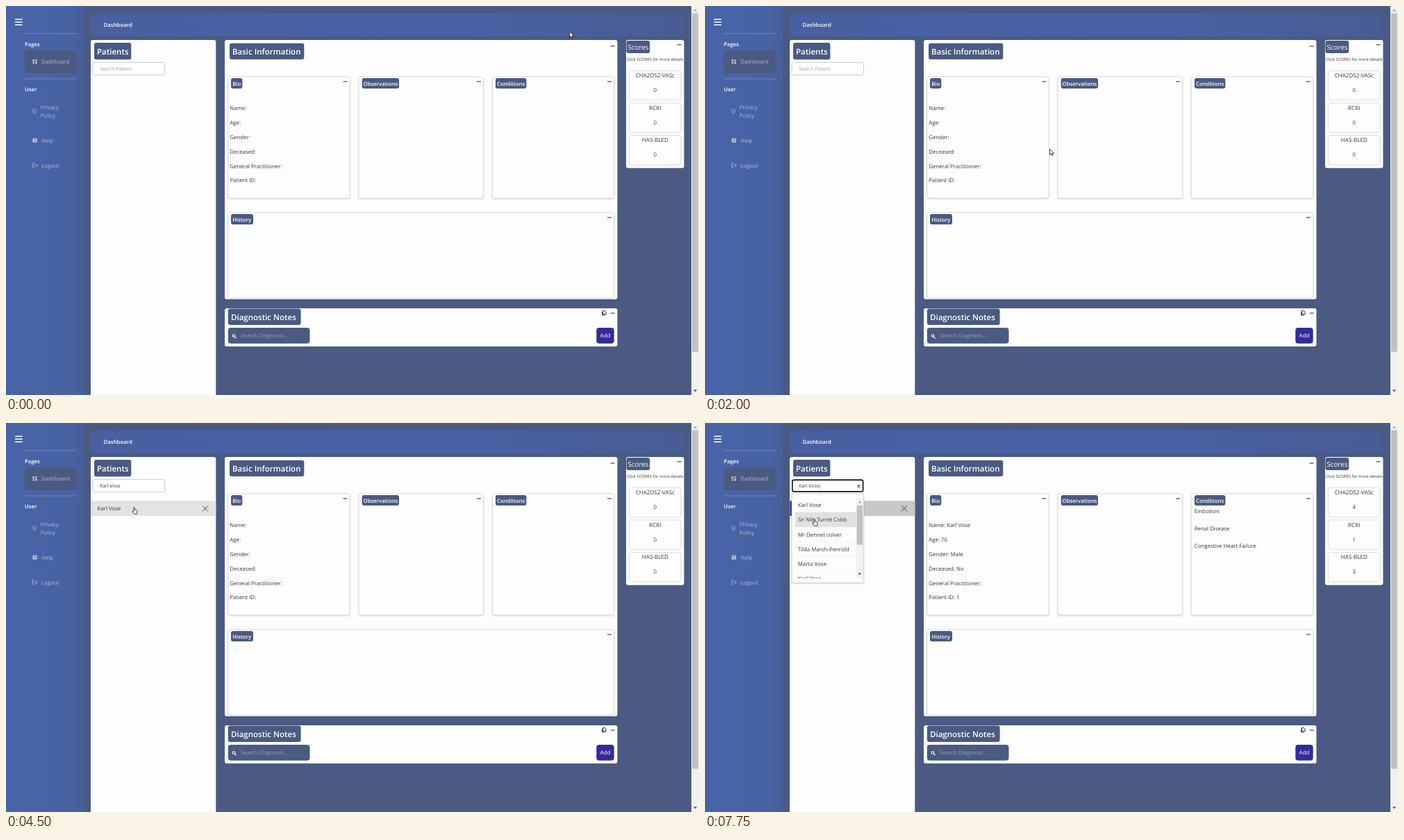
An HTML page for the animation above (8 s loop, 998 px wide and 561 px high).

```html
<!DOCTYPE html>
<html lang="en">
<head>
<meta charset="utf-8">
<title>Patient dashboard</title>
<style>
html, body { margin: 0; width: 100%; height: 100%; overflow: hidden; background: #4a5a82; }
svg { display: block; width: 998px; height: 561px; }
text { font-family: "Open Sans", "Noto Sans", sans-serif; text-rendering: geometricPrecision; white-space: pre; }
.card { fill: #fdfdfd; }
.badge, .dark { fill: #4a5a80; }
.box { fill: #fdfdfd; stroke: #d4d6de; stroke-width: .8; filter: drop-shadow(0 1px 1px rgba(0,0,0,.16)); }
.box.hover { filter: drop-shadow(0 8px 9px rgba(0,0,0,.3)); }
.flat { fill: #fdfdfd; stroke: #d2d4dc; stroke-width: .8; }
.menu { fill: #fdfdfd; stroke: #c9c9c9; stroke-width: .8; filter: drop-shadow(0 1px 1px rgba(0,0,0,.15)); }
.line { fill: none; stroke-linecap: round; stroke-linejoin: round; }
</style>
</head>
<body>
<svg id="stage" viewBox="0 0 998 561">
  <defs>
    <linearGradient id="side"><stop offset="0" stop-color="#4864a7"/><stop offset=".8" stop-color="#4863a4"/><stop offset="1" stop-color="#485f99"/></linearGradient>
    <linearGradient id="top"><stop offset="0" stop-color="#4860a0"/><stop offset=".6" stop-color="#4862a5"/><stop offset="1" stop-color="#485d94"/></linearGradient>
    <clipPath id="rows"><rect x="126" y="107" width="102" height="117"/></clipPath>
  </defs>
  <g id="page"></g>
  <g id="menu"></g>
  <g id="cursor"></g>
</svg>
<script>
const LOOP = 8000, STEP = 250;
const INK = '#33373d', MUTED = '#b4bdd2', BODY = 7.85;
const $ = id => document.getElementById(id);

const rect = (x, y, x2, y2, r = 0, attrs = '') =>
  `<rect x="${x}" y="${y}" width="${x2 - x}" height="${y2 - y}" rx="${r}" ${attrs}/>`;
const text = (x, y, str, o = {}) =>
  `<text x="${x}" y="${y}" font-size="${o.size || BODY}" fill="${o.fill || INK}" font-weight="${o.weight || 400}" text-anchor="${o.anchor || 'start'}" id="${o.id || ''}">${str}</text>`
    .replace(' id=""', '');
const line = (d, color, width = 1, fill = 'none') =>
  `<path class="line" d="${d}" stroke="${color}" stroke-width="${width}" style="fill:${fill}"/>`;
const minus = (x, y) => line(`M${x - 2.6} ${y}h5.2`, '#222', 1);
const badge = (x, y, x2, y2, str, tx, ty, size, weight = 600) =>
  rect(x, y, x2, y2, 3, 'class="badge"') + text(tx, ty, str, { size, weight, fill: '#fff' });
const fill = (x, y, x2, y2, color, r = 0) => rect(x, y, x2, y2, r, `fill="${color}"`);

const patient = 'Karl Vose';
const people = [patient, 'Sir Nils Turret Cobb', 'Mr Dennet colver', 'Tilda Marsh-Penrold', 'Marta Vose', patient];
const bio = [['Name:', patient], ['Age:', '76'], ['Gender:', 'Male'], ['Deceased:', 'No'], ['General Practitioner:', ''], ['Patient ID:', '1']];
const conditions = ['Embolism', 'Renal Disease', 'Congestive Heart Failure'];
const scores = [['CHA2DS2-VASc', 4], ['RCRI', 1], ['HAS-BLED', 3]];
const boxes = [[320, 102, 495, 277], [508, 102, 687.5, 277], [700.5, 102, 875.5, 277], [320, 298, 875.5, 421]];

function sidebar() {
  const item = { fill: MUTED }, head = { fill: '#fff', weight: 600, size: 7.7 };
  return fill(0, 0, 112, 561, 'url(#side)')
    + line('M13.5 19.3h9.6M13.5 23.3h9.6M13.5 27.3h9.6', '#fff', 1.4)
    + line('M27 39.8h74.5M27 105h74.5', '#8093c0', .8)
    + text(27, 57.5, 'Pages', head) + text(27, 123, 'User', head)
    + rect(27, 64, 101.3, 97, 4, 'class="dark"')
    + text(51, 83, 'Dashboard', item)
    + [[38.3, 77, 41, 80.6], [42, 77, 44.8, 78.8], [38.3, 81.5, 41, 83.4], [42, 79.8, 44.8, 83.4]]
        .map(b => fill(...b, MUTED)).join('')
    + text(49.8, 148.8, 'Privacy', item) + text(49.8, 161, 'Policy', item)
    + line('M41 148.7l2.4 1v2.2q0 2.3-2.4 3.4q-2.4-1.1-2.4-3.4v-2.2zM41 151v2', MUTED, .7)
    + text(51, 196.7, 'Help', item) + fill(38.3, 190.8, 44.8, 197, MUTED, 1)
    + text(41.5, 195.9, '?', { size: 5.5, weight: 700, fill: '#4863a4', anchor: 'middle' })
    + text(51, 232.7, 'Logout', item)
    + line('M40.8 226.8h-2.3v6h2.3M41 229.8h4M43.2 227.8l2 2-2 2', MUTED, .8);
}

function patientsCard() {
  return rect(122, 49, 302.3, 566, 3, 'class="card"')
    + badge(127, 53, 180.3, 77.3, 'Patients', 131, 69.9, 11.5)
    + rect(125, 81.4, 228.5, 99.6, 2.5, 'id="field" fill="#fff"')
    + text(135, 92.9, '', { id: 'query', size: 6.85 })
    + '<g id="clear">' + line('M219.8 89.2l3.4 3.6M223.2 89.2l-3.4 3.6', '#1c4f86', 1.1) + '</g>'
    + '<g id="chosen">' + rect(122, 112.3, 302.3, 134, 0, 'id="chosenBg"')
    + rect(122.6, 112.3, 125, 134, 0, 'id="bar" fill="#1414d8"')
    + text(131.5, 126, patient, { id: 'chosenName' })
    + line('M283.2 119.6l7.6 7.6M290.8 119.6l-7.6 7.6', '#444', 1) + '</g>';
}

function infoCard() {
  return rect(315, 49, 880.5, 423, 3, 'class="card"')
    + badge(322, 53.8, 429.3, 77, 'Basic Information', 326, 70, 11.5) + minus(873.6, 58)
    + boxes.map(b => rect(...b, 3, 'class="box"')).join('')
    + badge(324, 104, 340.3, 119, 'Bio', 326.2, 115, 7.75) + minus(488.5, 109)
    + badge(512.7, 104, 566, 119, 'Observations', 514.6, 115, 7.75) + minus(681, 109)
    + badge(705, 104, 749.4, 119, 'Conditions', 707, 115, 7.75) + minus(869, 109)
    + badge(324, 300, 356, 315, 'History', 326.2, 311, 7.75) + minus(869, 305)
    + bio.map((_, i) => text(322.3, 150.4 + i * 20.8, '', { id: 'bio' + i })).join('')
    + conditions.map((c, i) => text(704.7, 129.8 + i * 25, '', { id: 'cond' + i })).join('');
}

function notesCard() {
  return rect(315, 436, 880.5, 491, 3, 'class="card"')
    + badge(319.8, 436.5, 424.6, 460, 'Diagnostic Notes', 324, 453, 11.5) + minus(873.8, 443)
    + line('M860 439.6h2.6l1.5 1.5v3.5h-4.1zM858.6 441.2v4.8h3.8', '#222', .9)
    + rect(319.8, 464, 437.5, 486.8, 4, 'class="dark"')
    + line('M329.8 475.5a1.8 1.8 0 1 1-3.6 0a1.8 1.8 0 1 1 3.6 0M329.4 477l2 2', '#fff', 1.1)
    + text(338, 478.4, 'Search Diagnosis...', { fill: '#98a2b8' })
    + fill(850.3, 464, 875.7, 486.8, '#342b9a', 4)
    + text(863, 478.4, 'Add', { fill: '#fff', weight: 500, anchor: 'middle', size: 8 });
}

function scoresCard() {
  const mid = { anchor: 'middle', size: 8.1 };
  return rect(893, 49, 976.5, 233.7, 3, 'class="card"')
    + badge(893.5, 50, 927.2, 68, 'Scores', 895.4, 62.8, 9.9, 400) + minus(969.6, 55.8)
    + text(934.8, 79, 'Click SCORES for more details', { size: 5.95, anchor: 'middle' })
    + scores.map(([name], i) => {
        const y = 93.2 + i * 46.7;
        return rect(897.5, y, 972, y + 42.4, 3, 'class="flat"')
          + text(934.8, y + 9.8, name, mid) + text(934.8, y + 30.6, '0', { ...mid, size: BODY, id: 'score' + i });
      }).join('');
}

function scrollbar() {
  return fill(987, 0, 998, 561, '#f1f1f1') + fill(988, 10.5, 997, 498.7, '#c1c1c1')
    + '<path d="M990 7.5l2.6-3 2.6 3z" fill="#a3a3a3"/><path d="M990 553.5l2.6 3 2.6-3z" fill="#505050"/>';
}

function menu() {
  return rect(125, 102, 228.5, 230.4, 2, 'class="menu"')
    + '<g clip-path="url(#rows)">'
    + people.map((name, i) => {
        const y = 107.7 + i * 21.3;
        return rect(129.8, y, 217.5, y + 21, 0, `id="row${i}"`)
          + line(`M129.8 ${y + 21.2}h87.7`, '#dedede', .7) + text(133.7, y + 13.2, name);
      }).join('') + '</g>'
    + fill(217.8, 108, 227.8, 224, '#f1f1f1') + fill(218.6, 118.8, 227, 175.6, '#c1c1c1')
    + '<path d="M220.4 115.2l2.4-2.8 2.4 2.8z" fill="#a3a3a3"/><path d="M220.4 216.5l2.4 2.8 2.4-2.8z" fill="#505050"/>';
}

const pointers = {
  arrow: line('M0 0V8.2L1.9 6.5 3.2 9.3 4.5 8.7 3.2 6H5.7Z', '#111', .8, '#fff'),
  text: line('M-1.9 -3.9h3.8M-1.9 3.9h3.8M0 -3.9v7.8', '#111', 1.3),
  hand: line('M-.8 5.6V.9Q-.8 0 0 0T.8 .9V3.6L3.4 4.1Q4.5 4.4 4.4 5.5L3.8 9.5H-.2L-2.4 6.5Q-2.8 5.5-1.9 5.2Z', '#111', .8, '#fff')
};

// time, x, y of the pointer's hot spot
const path = [
  [0, 811.8, 37], [1250, 688, 274.3], [3000, 201.3, 102], [3250, 197, 95], [3500, 184.6, 121.6],
  [4750, 184.6, 121.6], [5250, 160.6, 122.2], [6500, 160.6, 122.2], [7000, 170, 93], [7250, 169, 97],
  [7500, 160, 128], [7750, 157.6, 138.6]
];

function pointerAt(t) {
  const i = path.findIndex(p => p[0] > t);
  if (i < 0) return path[path.length - 1].slice(1);
  const [t0, x0, y0] = path[i - 1], [t1, x1, y1] = path[i];
  const u = (t - t0) / (t1 - t0), k = u * u * (3 - 2 * u);
  return [x0 + (x1 - x0) * k, y0 + (y1 - y0) * k];
}

const inside = (x, y, [l, t, r, b]) => x >= l && x <= r && y >= t && y <= b;
const show = (id, on) => { $(id).style.display = on ? '' : 'none'; };
const paint = (id, attrs) => { for (const k in attrs) $(id).setAttribute(k, attrs[k]); };

function render(t) {
  const [x, y] = pointerAt(t);
  const open = t >= 3250 && t < 4000 || t >= 7000;
  const picked = t >= 4000, loaded = t >= 5250;
  const overField = inside(x, y, [125, 81, 228.5, 103]);
  const overRow = open && inside(x, y, [129.8, 107.7, 217.5, 224]) ? Math.floor((y - 107.7) / 21.3) : -1;
  const overChosen = picked && !open && inside(x, y, [122, 112.3, 302.3, 134]);

  paint('field', open
    ? { x: 125.8, y: 82.1, width: 101.8, height: 16.8, stroke: '#151515', 'stroke-width': 1.6 }
    : { x: 125, y: 81.4, width: 103.5, height: 18.2, stroke: '#bfc2c9', 'stroke-width': .8 });
  $('query').innerHTML = picked ? patient + (open ? '<tspan dx="-.4">|</tspan>' : '') : 'Search Patient';
  paint('query', { fill: picked ? INK : '#999' });
  show('clear', picked && (open || overField));

  show('chosen', picked);
  show('bar', loaded);
  paint('chosenBg', { fill: loaded ? '#c8c8c8' : overChosen ? '#e3e3e1' : '#fdfdfd' });
  paint('chosenName', { x: loaded ? 133 : 131.5 });

  show('menu', open);
  people.forEach((_, i) => paint('row' + i, { fill: i === overRow ? '#e1e1e1' : '#fdfdfd' }));

  bio.forEach(([label, value], i) => { $('bio' + i).textContent = loaded ? `${label} ${value}` : label; });
  conditions.forEach((name, i) => { $('cond' + i).textContent = loaded ? name : ''; });
  scores.forEach(([, n], i) => { $('score' + i).textContent = loaded ? n : 0; });

  document.querySelectorAll('.box').forEach((el, i) => {
    const [l, top, r, b] = boxes[i];
    el.classList.toggle('hover', inside(x, y, [l, top, r + 1, b]));
  });

  const kind = overRow >= 0 || overChosen ? 'hand' : overField ? 'text' : 'arrow';
  $('cursor').innerHTML = pointers[kind];
  paint('cursor', { transform: `translate(${x} ${y})` });
}

$('page').innerHTML = sidebar() + fill(122, 10.5, 976.7, 43.8, 'url(#top)', 4)
  + text(140.6, 30, 'Dashboard', { fill: '#fff', weight: 600, size: 7.8 })
  + patientsCard() + infoCard() + notesCard() + scoresCard() + scrollbar();
$('menu').innerHTML = menu();

let last = -1;
const start = performance.now();
function tick() {
  const t = Math.floor((performance.now() - start) % LOOP / STEP) * STEP;
  if (t !== last) render(last = t);
  requestAnimationFrame(tick);
}
tick();
</script>
</body>
</html>
```
